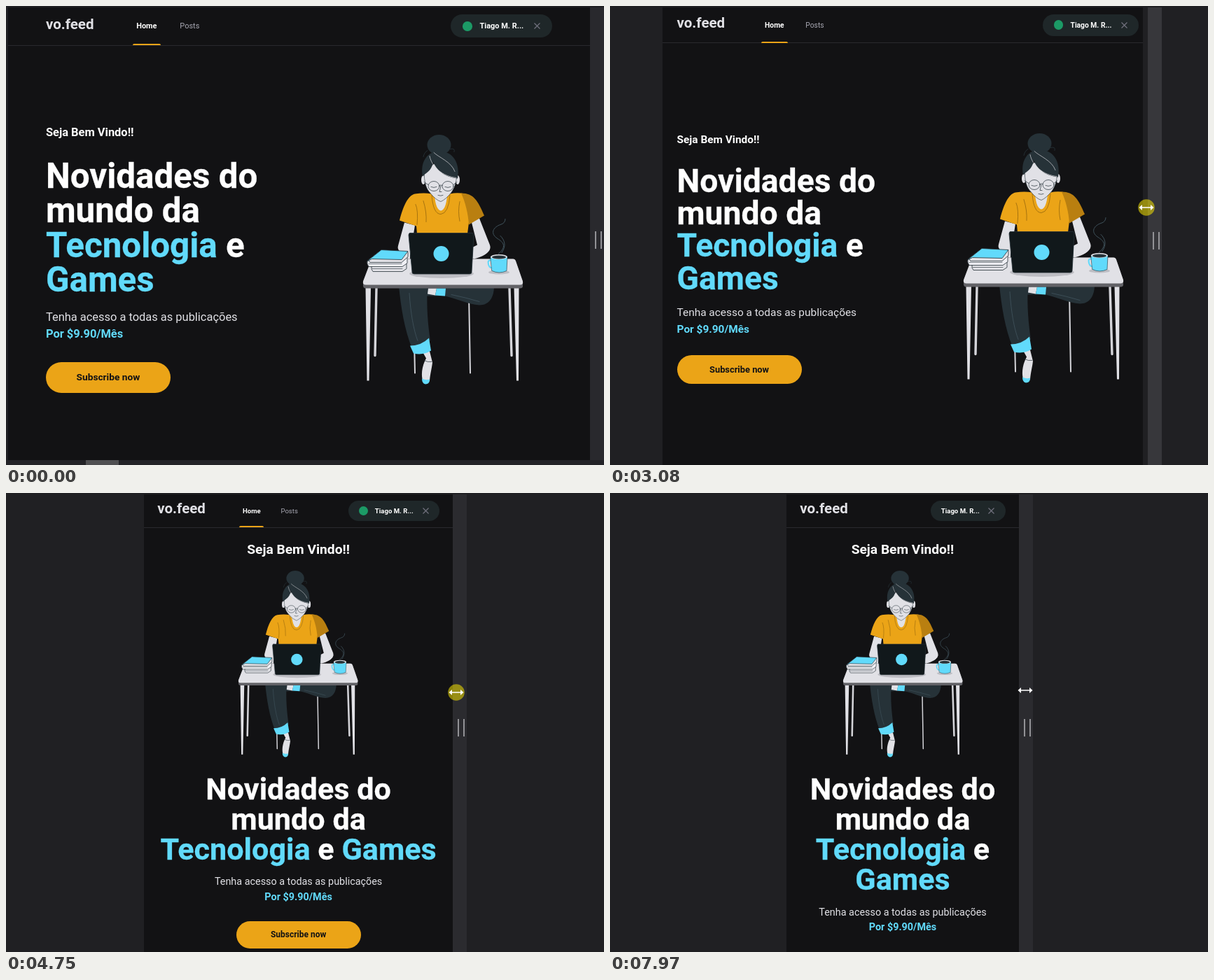
An HTML page that plays this animation: 854 px wide and 656 px high, repeating every 8 s.

```html
<!DOCTYPE html>
<html lang="pt-BR">
<head>
<meta charset="utf-8">
<title>Responsive preview</title>
<style>
@property --left { syntax: "<length>"; inherits: true; initial-value: 3px; }
@property --view { syntax: "<length>"; inherits: true; initial-value: 831px; }
@property --page { syntax: "<length>"; inherits: true; initial-value: 831px; }
@property --bar { syntax: "<length>"; inherits: true; initial-value: 834px; }
@property --cx { syntax: "<length>"; inherits: true; initial-value: 845px; }
@property --cy { syntax: "<length>"; inherits: true; initial-value: 298px; }
@property --mid { syntax: "<length>"; inherits: true; initial-value: 337.8px; }
@property --grip { syntax: "<length>"; inherits: true; initial-value: 320px; }

html, body { margin: 0; height: 100%; overflow: hidden; background: #202023; }
* { box-sizing: border-box; }
.stage {
  position: relative; width: 854px; height: 656px; overflow: hidden;
  background: #202023; font-family: Roboto, Arial, sans-serif; color: #e1e1e6;
  animation: drag 8s linear infinite, press 8s step-end infinite;
}
.view {
  position: absolute; top: 2px; bottom: 0; left: var(--left); width: var(--view);
  overflow: hidden; background: #121214;
}
.page { position: relative; width: var(--page); height: 100%; container-type: inline-size; }
header, main { --r: 10.96px; }
.row { max-width: 767px; margin: 0 auto; padding: 0 calc(2 * var(--r)); }

/* top bar */
header { height: calc(5 * var(--r)); border-bottom: 1px solid #29292e; }
header .row { display: flex; align-items: center; height: 100%; white-space: nowrap; }
.logo { width: 69px; font-size: 20.5px; font-weight: 700; line-height: 1; position: relative; top: -3px; }
nav { margin-left: calc(5 * var(--r)); font-size: var(--r); line-height: calc(5 * var(--r)); display: flex; gap: calc(2 * var(--r)); }
nav span { position: relative; padding: 0 calc(.5 * var(--r)); color: #a8a8b3; }
nav .on { color: #fff; font-weight: 700; }
nav .on::after {
  content: ""; position: absolute; left: 0; right: 0; bottom: 0; height: 2.2px;
  border-radius: 2px 2px 0 0; background: #eba417;
}
.user {
  display: flex; align-items: center; margin-left: auto;
  width: calc(24.7px + 10.95 * var(--r)); height: calc(3 * var(--r));
  padding: 0 calc(1.5 * var(--r)); border-radius: 99px;
  background: #1f2729; color: #fff; font-size: var(--r); font-weight: 700;
}
.dot { flex: none; width: 13.7px; height: 13.7px; margin-right: var(--r); border-radius: 50%; background: #1c9a66; }
.user svg { flex: none; width: 11px; height: 11px; margin-left: auto; }

/* hero */
main { position: absolute; top: 0; left: 0; right: 0; height: 100%; }
.copy {
  position: absolute; left: calc(2 * var(--r)); top: calc(var(--mid) - 15.47 * var(--r));
  width: min(411px, 100% - 4 * var(--r));
}
.hi { font-size: calc(1.5 * var(--r)); line-height: calc(2 * var(--r)); font-weight: 700; color: #fff; }
h1 {
  margin: calc(2.46 * var(--r)) 0 0; font-size: calc(4.5 * var(--r));
  line-height: calc(4.5 * var(--r)); font-weight: 700; color: #fff;
  -webkit-text-stroke: .3px;
}
h1 span, p b { color: #61dafb; }
p {
  margin: calc(1.5 * var(--r)) 0 calc(2.48 * var(--r)); white-space: nowrap;
  font-size: calc(1.5 * var(--r)); line-height: calc(2.25 * var(--r));
}
.btn {
  width: 178px; height: calc(4 * var(--r)); line-height: calc(4 * var(--r)); border-radius: 99px;
  background: #eba417; color: #121214; text-align: center;
  font-size: calc(1.25 * var(--r)); font-weight: 700;
}
.art {
  position: absolute; width: 228px; height: 356.5px; right: max(0px, 32.4% - 184.5px);
  top: calc(var(--mid) + 2.5 * var(--r) - 183.7px); overflow: visible;
}

@container (max-width: 740px) { header, main { --r: 10.28px; } }
@container (max-width: 526px) {
  .copy { top: 69.4px; right: calc(2 * var(--r)); width: auto; text-align: center; }
  .hi { font-size: calc(2 * var(--r)); }
  h1 { margin-top: 311px; }
  .btn { margin: 0 auto; }
  .art { left: calc(50% - 85.2px); right: auto; top: 109px; width: 170.4px; height: 266.4px; }
}
@container (max-width: 493px) { header, main { --r: 9.59px; } }
@container (max-width: 411px) { nav { display: none; } }
@container (max-width: 342px) {
  .dot { display: none; }
  .user { width: calc(11px + 9.95 * var(--r)); }
}

/* resize handle, scrollbar, pointers */
.bar {
  position: absolute; top: 2px; bottom: 0; left: var(--bar); width: 20px;
  background: #2a2a2d; animation: hover 8s step-end infinite;
}
.bar::after {
  content: ""; position: absolute; left: 7px; top: var(--grip); width: 6px; height: 25px;
  border: solid #929296; border-width: 0 2px;
}
.scroll { position: absolute; left: 0; right: 0; top: 649px; height: 7px; background: #232327; animation: until-press 8s step-end infinite; }
.scroll::after { content: ""; position: absolute; left: 114px; width: 47px; height: 7px; background: #505052; }
.arrow { position: absolute; left: 0; top: 0; width: 13px; height: 20px; animation: fly 8s ease-in-out infinite, arrow-on 8s step-end infinite; }
.resize { position: absolute; left: calc(var(--cx) - 12px); top: calc(var(--cy) - 12px); width: 24px; height: 24px; animation: resize-on 8s step-end infinite; }
.resize circle { animation: halo 8s step-end infinite; }

@keyframes drag {
  0%, 26.9% { --left: 3px; --view: 831px; --page: 831px; --bar: 834px; --cx: 845px; --cy: 298px; }
  36.875% { --left: 68px; --view: 699px; --page: 712px; --bar: 773px; --cx: 772px; --cy: 289px; }
  38.5%, 39.1% { --left: 75px; --view: 686px; --page: 701px; --bar: 768px; --cx: 766px; --cy: 288px; }
  47.25% { --left: 169px; --view: 516px; --page: 505px; --bar: 689px; --cx: 684px; --cy: 285px; }
  47.75% { --left: 170px; --view: 498px; --page: 492px; --bar: 668px; --cx: 674px; --cy: 285px; }
  52.5%, 53% { --left: 173px; --view: 490px; --page: 480px; --bar: 663px; --cx: 669px; --cy: 285px; }
  57.5% { --left: 191px; --view: 453px; --page: 453px; --bar: 644px; --cx: 650px; --cy: 285px; }
  65.5%, 65.9% { --left: 217px; --view: 402px; --page: 402px; --bar: 619px; --cx: 621px; --cy: 285px; }
  68.125% { --left: 232px; --view: 373px; --page: 373px; --bar: 605px; --cx: 612px; --cy: 285px; }
  75.5%, 76.6% { --left: 243px; --view: 351px; --page: 351px; --bar: 594px; --cx: 603.5px; --cy: 285px; }
  78.9% { --left: 247px; --view: 343px; --page: 343px; --bar: 590px; --cx: 600px; --cy: 285px; }
  82.75%, 99.5% { --left: 252px; --view: 332px; --page: 332px; --bar: 584px; --cx: 596px; --cy: 285px; }
  99.6%, 100% { --left: 252px; --view: 332px; --page: 332px; --bar: 584px; --cx: 593px; --cy: 282px; }
}
@keyframes press {
  0% { --mid: 337.8px; --grip: 320px; }
  21.5% { --mid: 338.8px; --grip: 321px; }
  27.5%, 100% { --mid: 338.1px; --grip: 321px; }
}
@keyframes hover {
  0% { background: #29292d; }
  21.5% { background: #37373b; }
  47.5%, 100% { background: #2b2b2f; }
}
@keyframes until-press { 0% { opacity: 1; } 21.5%, 100% { opacity: 0; } }
@keyframes halo { 0% { opacity: 0; } 21.5% { opacity: 1; } 99.25%, 100% { opacity: 0; } }
@keyframes fly {
  0%, 2.6% { transform: translate(837px, 658px); }
  8.6%, 11.4% { transform: translate(818px, 283px); }
  13%, 100% { transform: translate(834px, 293px); }
}
@keyframes arrow-on { 0% { opacity: 0; } 3% { opacity: 1; } 13%, 100% { opacity: 0; } }
@keyframes resize-on { 0% { opacity: 0; } 13%, 100% { opacity: 1; } }
</style>
</head>
<body>
<div class="stage">
  <div class="view"><div class="page">
    <header><div class="row">
      <div class="logo">vo.feed</div>
      <nav><span class="on">Home</span><span>Posts</span></nav>
      <div class="user">
        <i class="dot"></i>Tiago M. R...
        <svg viewBox="0 0 11 11"><path d="M1.5 1.5l8 8m0-8l-8 8" stroke="#737380" stroke-width="1.1"/></svg>
      </div>
    </div></header>
    <main class="row">
      <div class="copy">
        <div class="hi">Seja Bem Vindo!!</div>
        <h1>Novidades do mundo da <span>Tecnologia</span> e <span>Games</span></h1>
        <p>Tenha acesso a todas as publicações<br><b>Por $9.90/Mês</b></p>
        <div class="btn">Subscribe now</div>
      </div>
      <svg class="art" viewBox="510 183.5 228 356.5" fill="none" stroke-linecap="round" stroke-linejoin="round">
        <!-- back table legs -->
        <g stroke="#d4d4d9">
          <path d="M583 478l1 46M661 410l2 114" stroke-width="2"/>
          <path d="M529 403l-2 96M719 403l3 96" stroke-width="3.4"/>
        </g>
        <!-- legs -->
        <g fill="#263238">
          <path d="M600 400H697C697 416 690 427 676 427C660 426 642 417 627 414H600Z"/>
          <path d="M561 400H602C600 430 603 458 606 478L580 489C569 462 564 430 561 400Z"/>
        </g>
        <path d="M603 403h12l-2 10-11-2Z" fill="#e1e1e6"/>
        <path d="M615 403h13l-1 11-14-1Z" fill="#61dafb"/>
        <path d="M576 410C578 440 582 462 588 478M636 412q20 4 40 10" stroke="#455a64" stroke-width=".7"/>
        <path d="M595 494L600 503C594 514 592 528 596 537Q601 541 605 535C606 524 608 518 609 509L605 493Z" fill="#e1e1e6"/>
        <path d="M594 532Q600 535 605 533Q605 540 599 540Q594 539 594 532Z" fill="#61dafb"/>
        <path d="M597 506q5 3 11 2" stroke="#263238" stroke-width=".7"/>
        <path d="M577 485Q593 485 604 474L607 492Q596 499 582 496Z" fill="#61dafb"/>
        <!-- arms, shirt -->
        <path d="M569 309L584 313L577 356Q557 352 560 342ZM664 305L676 303L691 341Q694 350 681 356L666 361L667 344L673 341Z" fill="#e1e1e6"/>
        <path d="M608 268Q597 266 584 268C574 270 567 286 562 306L586 314L587 325H659L661 309C670 290 664 268 650 267Q642 266 634 268Z" fill="#eba417"/>
        <path d="M650 267C668 267 674 278 683 299L661 312C660 296 656 280 650 267Z" fill="#b97f10"/>
        <path d="M608 270Q610 297 621 297Q632 296 634 270M587 312Q589 292 585 283M596 278q5 16 4 30M648 279Q645 293 648 307" stroke="#8a5f0c" stroke-width=".7"/>
        <!-- bun, head -->
        <ellipse cx="618.5" cy="198" rx="17" ry="14.5" fill="#263238"/>
        <path d="M634 204q8 -2 6 4M602 206q-5 3-6 9" stroke="#263238" stroke-width=".9"/>
        <g fill="#e1e1e6">
          <path d="M612 264V271Q614 291 621 292Q628 291 630 271V264Z"/>
          <ellipse cx="596" cy="248" rx="3" ry="6.5"/>
          <ellipse cx="645" cy="248" rx="3" ry="6.5"/>
          <path d="M597 234C597 252 600 261 606 267Q614 277 621 279Q628 276 636 266C641 259 644 250 644 234L620 220Z" stroke="#263238" stroke-width=".6"/>
        </g>
        <path d="M595 243C591 222 602 207 619 207C638 207 649 224 645 246C632 245 616 238 610 222C609 231 604 236 598 240Z" fill="#263238"/>
        <path d="M605 214C608 230 624 243 643 245M611 209C618 216 636 222 641 236" stroke="#d4d4d9" stroke-width=".7"/>
        <g stroke="#263238" stroke-width=".7">
          <ellipse cx="611" cy="257" rx="8" ry="7"/><ellipse cx="631" cy="257" rx="8" ry="7"/>
          <path d="M619 256q2-1.500 4 0M603 255l-6-4M639 255l5-4M607 258q4 2 8 0M627 258q4 2 8 0M621 257l-2 8h3M617 270q4 1.500 7 0"/>
        </g>
        <!-- table -->
        <path d="M513.500 402h7.500l-2.500 133h-3ZM725.500 402h7l-.5 133h-3Z" fill="#e1e1e6"/>
        <path d="M525 361H724Q727 361 728 364L738 393V400Q738 403 734 403H514Q510 403 510 399V393L521 364Q522 361 525 361Z" fill="#626267"/>
        <path d="M525 361H724Q727 361 728 364L738 393Q739 398 734 398H514Q509 398 510 393L521 364Q522 361 525 361Z" fill="#e1e1e6"/>
        <path d="M562 361Q562 349 577 353V361ZM667 349L690 347Q688 356 668 361Z" fill="#e1e1e6"/>
        <ellipse cx="622" cy="382" rx="46" ry="6.500" fill="#bdbdc3"/>
        <!-- laptop -->
        <path d="M577 324H666Q668.500 324 668 327L665 380Q665 382.500 662 382.500H583Q580 382.500 580 380L575 327Q575 324 577 324Z" fill="#11181b" stroke="#263238" stroke-width=".8"/>
        <circle cx="621.5" cy="353.5" r="11" fill="#61dafb"/>
        <!-- books -->
        <g stroke="#263238" stroke-width=".8">
          <path d="M522 372L532 366H572V375L566 379H524Q521 376 522 372Z" fill="#e1e1e6"/>
          <path d="M516 364L526 358H573V367L566 372H518Q515 368 516 364Z" fill="#f0f0f5"/>
          <path d="M518 362L535 349L574 351V358L565 366L520 366Z" fill="#e1e1e6"/>
          <path d="M516 364L536 348L574 350L565 362L523 361Z" fill="#61dafb"/>
          <path d="M523 375h43M518 368h47" stroke-width=".6"/>
        </g>
        <!-- mug -->
        <ellipse cx="704" cy="380" rx="15" ry="3" fill="#bdbdc3"/>
        <path d="M693 363q-6-1-4 6q2 6 6 4" stroke="#61dafb" stroke-width="2.200"/>
        <path d="M692 358H716L715 378Q704 383 694 378Z" fill="#61dafb" stroke="#263238" stroke-width=".6"/>
        <ellipse cx="704" cy="358" rx="12" ry="3.600" fill="#e1e1e6"/>
        <ellipse cx="704" cy="358.500" rx="10" ry="2.600" fill="#263238"/>
        <path d="M703 354C716 343 710 337 702 332C690 324 697 315 706 312Q713 310 713 304M708 352C715 342 712 334 706 328" stroke="#455a64" stroke-width=".9"/>
      </svg>
    </main>
  </div></div>
  <div class="bar"></div>
  <div class="scroll"></div>
  <svg class="arrow" viewBox="0 0 13 20"><path d="M.5.5V16.500L4.300 13L6.800 19L9.300 18L6.800 12H12Z" fill="#fff" stroke="#000" stroke-width=".8"/></svg>
  <svg class="resize" viewBox="0 0 24 24">
    <circle cx="12" cy="12" r="11.800" fill="#ffeb00" fill-opacity=".52"/>
    <path d="M1.500 12l4.500-4v3.300h12V8l4.500 4-4.500 4v-3.300H6v3.300Z" fill="#fff"/>
  </svg>
</div>
</body>
</html>
```
